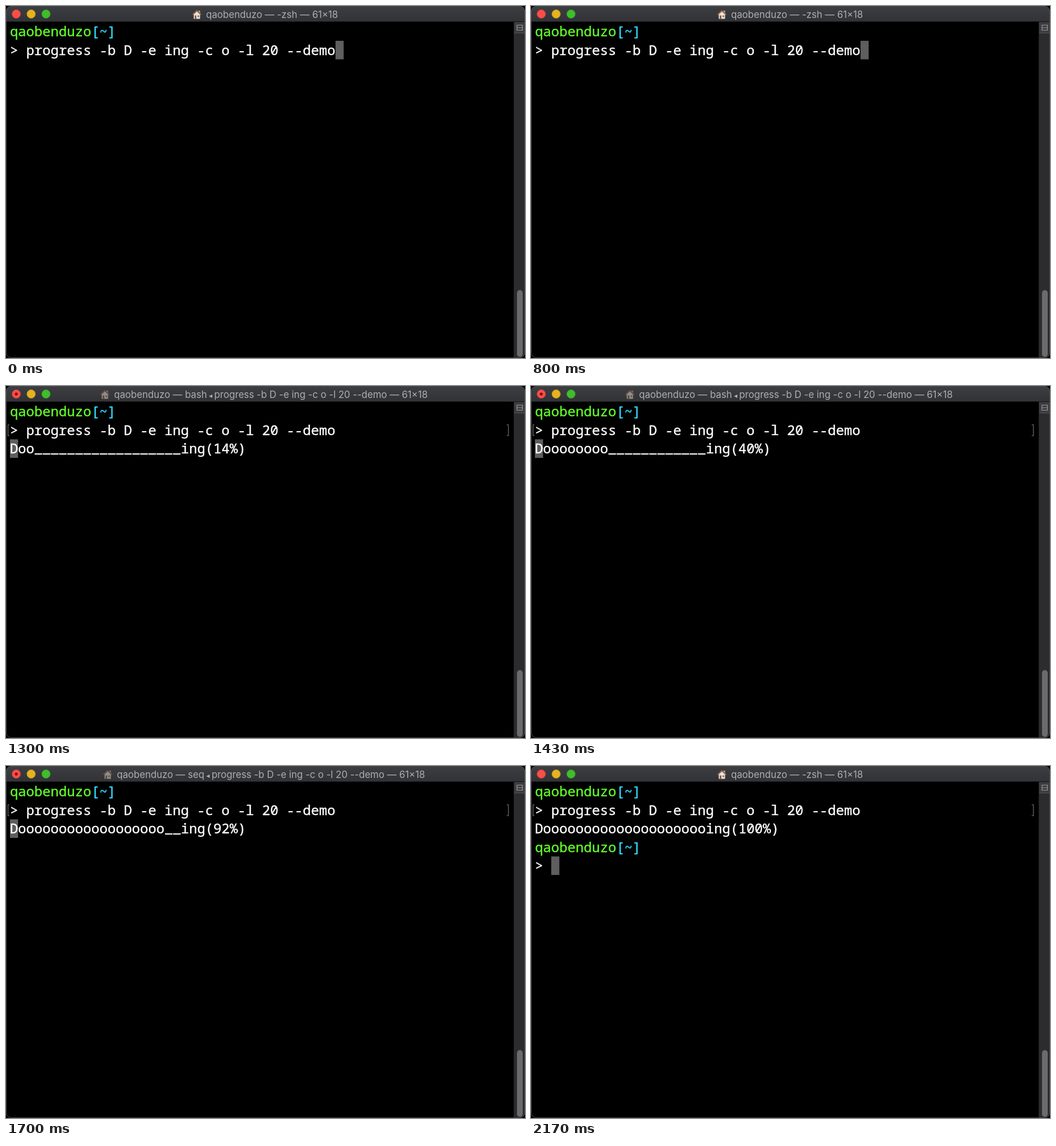
Animation of 908x617 px, one loop 2.21 s. Source, as an HTML page:

```html
<!DOCTYPE html>
<html lang="en">
<head>
<meta charset="utf-8">
<title>Terminal progress bar</title>
<style>
  html, body { margin: 0; width: 100%; height: 100%; overflow: hidden; background: #000; }
  svg { display: block; width: 908px; height: 617px; }
  text { white-space: pre; }
  .term text {
    font: 23.73px "Noto Sans Mono", "DejaVu Sans Mono", monospace;
    color: #fff; fill: currentColor; stroke: currentColor; stroke-width: .4;
  }
  .term .user { color: #62ff26; }
  .term .path { color: #30daff; }
  .term .blank { font-size: 21.4px; letter-spacing: 1.4px; }
  .title { font: 16.65px Inter, "DejaVu Sans", sans-serif; fill: #adaeb0; }
  .title .arrow { font-size: 12px; }
  .mark { fill: none; stroke: #7d7d76; stroke-width: 1.1; }
</style>
</head>
<body>
<svg viewBox="0 0 908 617">
  <defs>
    <linearGradient id="bar" x2="0" y2="1">
      <stop offset="0" stop-color="#3d3e42"/>
      <stop offset="1" stop-color="#323337"/>
    </linearGradient>
    <clipPath id="window"><rect width="908" height="617" rx="9"/></clipPath>
  </defs>
  <g clip-path="url(#window)">
    <rect width="908" height="617"/>
    <rect width="908" height="27" fill="url(#bar)"/>
    <rect y="27" width="908" height="1" fill="#111214"/>

    <circle cx="18" cy="14" r="7.4" fill="#fd4d48" stroke="#d9423d" stroke-width=".8"/>
    <circle id="busyDot" cx="18" cy="14" r="2.6" fill="#7c0b08"/>
    <circle cx="44" cy="14" r="7.4" fill="#e4b31f" stroke="#c0971b" stroke-width=".8"/>
    <circle cx="70" cy="14" r="7.4" fill="#40bd2b" stroke="#369f25" stroke-width=".8"/>

    <g id="house">
      <path d="M2.5 8 8 3l5.500 5v8h-11z" fill="#e9e3d5"/>
      <path d="M11 1.500h2.500v5H11z" fill="#b9a99a"/>
      <path d="M.5 8.800 8 1.700l7.500 7.100" fill="none" stroke="#9a6548" stroke-width="2"/>
      <path d="M4.300 10h2.700v6H4.300z" fill="#8a5233"/>
      <path d="M9 10h3v3H9z" fill="#6a8694"/>
    </g>
    <text class="title" y="21"><tspan id="owner"></tspan><tspan id="arrow" class="arrow"></tspan><tspan id="job"></tspan></text>

    <rect x="889" y="28" width="19" height="589" fill="#2c2c2e"/>
    <rect x="888" y="28" width="1" height="589" fill="#1c1c1d"/>
    <rect x="889" y="28" width="19" height="20" fill="#3d3d40"/>
    <rect x="889" y="47" width="19" height="1" fill="#515154"/>
    <path d="M894 33.500h9.500v9H894zM894 38h9.500" fill="none" stroke="#98989a" stroke-width="1.200"/>
    <rect x="894" y="498" width="10" height="117" rx="5" fill="#6b6b6d"/>

    <g class="term">
      <rect id="cursor" width="14.24" height="32.5" fill="#5e5e5e"/>
      <g id="lines"></g>
    </g>
    <g id="marks" class="mark">
      <path d="M6 68H3.500v19H6"/>
      <path d="M876 68h3v19h-3"/>
    </g>
  </g>
  <rect x=".5" y=".5" width="907" height="616" rx="9" fill="none" stroke="#48494c"/>
</svg>

<script>
const LOOP = 2210, LAST = 65;
const COL = 14.24, ROW = 32.5, LEFT = 6.9, TOP = 28.5;
const ENTER = 36, DONE = 53;
const USER = "qaobenduzo", BEGIN = "D", END = "ing", SIZE = 20;
const COMMAND = `progress -b ${BEGIN} -e ${END} -c o -l ${SIZE} --demo`;

const $ = id => document.getElementById(id);
const show = (id, on) => $(id).setAttribute("visibility", on ? "visible" : "hidden");
const colX = col => LEFT + col * COL;
const baseline = row => TOP + row * ROW + 24.7;

function line(row, col, cls) {
  const el = document.createElementNS("http://www.w3.org/2000/svg", "text");
  el.setAttribute("x", colX(col));
  el.setAttribute("y", baseline(row));
  if (cls) el.setAttribute("class", cls);
  $("lines").append(el);
  return el;
}

function prompt(row) {
  const user = line(row, 0, "user"), path = line(row, USER.length, "path"), input = line(row + 1, 0);
  return (on, text = "") => {
    user.textContent = on ? USER : "";
    path.textContent = on ? "[~]" : "";
    input.textContent = on ? "> " + text : "";
  };
}

const first = prompt(0), next = prompt(3);
const filled = line(2, 0), blank = line(2, 0, "blank"), tail = line(2, BEGIN.length + SIZE);
blank.setAttribute("y", baseline(2) - 1.5);

function moveCursor(row, col) {
  $("cursor").setAttribute("x", colX(col));
  $("cursor").setAttribute("y", TOP + row * ROW);
}

function setTitle(x, shell, command) {
  $("owner").textContent = `${USER} — ${shell}`;
  $("owner").setAttribute("x", x);
  $("arrow").textContent = command ? " ◂ " : "";
  $("job").textContent = `${command} — 61×18`;
  $("house").setAttribute("transform", `translate(${x - 24} 6.500)`);
  $("house").setAttribute("opacity", command ? 0.5 : 1);
  show("busyDot", command);
}

function setBar(on, percent) {
  const full = Math.floor(percent * SIZE / 100);
  filled.textContent = on ? BEGIN + "o".repeat(full) : "";
  blank.textContent = on ? "_".repeat(SIZE - full) : "";
  blank.setAttribute("x", colX(BEGIN.length + full) + 0.7);
  tail.textContent = on ? `${END}(${percent}%)` : "";
}

function draw(step) {
  const entered = step >= ENTER, done = step >= DONE;
  const busy = step > ENTER && !done;
  const percent = Math.max(0, Math.min(100, Math.floor(40 + 6.5 * (step - 43))));

  first(true, COMMAND);
  next(done);
  setBar(step > ENTER, percent);
  show("marks", entered);

  if (!entered) moveCursor(1, 2 + COMMAND.length);
  else if (!done) moveCursor(2, 0);
  else moveCursor(4, 2);

  if (!busy) setTitle(350, "-zsh", "");
  else if (step < 46) setTitle(189, "bash", COMMAND);
  else setTitle(194, "seq", COMMAND);
}

let shown = -1;
function tick() {
  const t = Math.floor(performance.now() % LOOP / 10) * 10;
  const step = Math.min(LAST, Math.floor((t + 5) * 0.03));
  if (step !== shown) draw(shown = step);
  requestAnimationFrame(tick);
}
tick();
</script>
</body>
</html>
```
